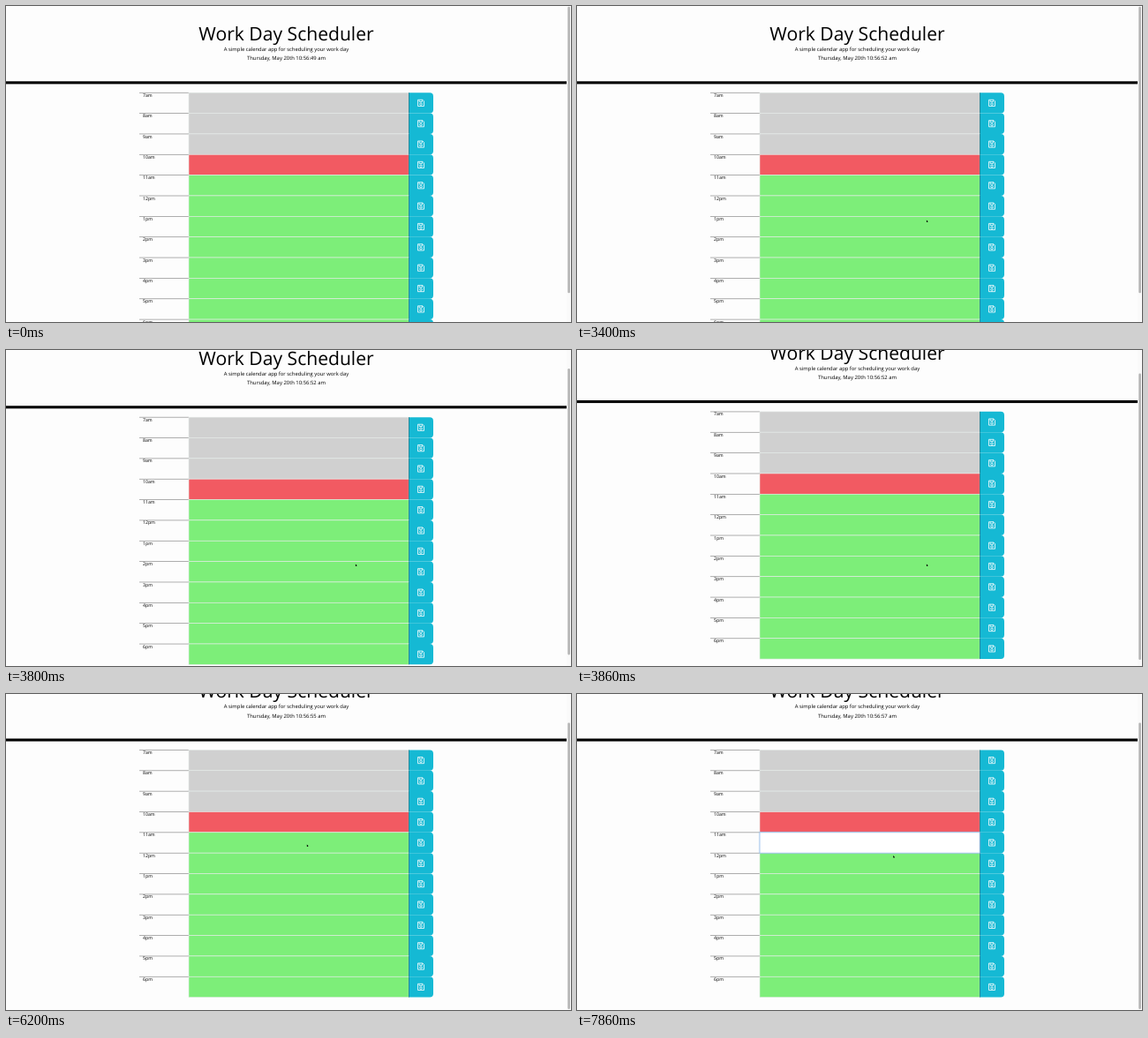
Animation, 640 px wide and 358 px high, one loop 8 s. Source, as an HTML page:

```html
<!DOCTYPE html>
<html lang="en">
<head>
<meta charset="utf-8">
<title>Work Day Scheduler</title>
<style>
html, body { margin: 0; width: 100%; height: 100%; overflow: hidden; background: #fdfdfd; }
svg { display: block; width: 100vw; height: 100vh; font-family: "Open Sans", "Noto Sans", sans-serif; text-rendering: geometricPrecision; }
.mid { text-anchor: middle; }
</style>
</head>
<body>
<svg viewBox="0 0 640 358">
  <defs>
    <g id="disk" fill="none" stroke="#fff" stroke-width=".8">
      <path d="M-3.5 -3.6H2L3.5 -2V3.6H-3.5Z" stroke-linejoin="round"/>
      <path d="M-1.8 -3.4V-1.3H1.4V-3.4"/>
      <rect x="-1.3" y=".3" width="2.6" height="2" rx=".6"/>
    </g>
  </defs>
  <rect width="640" height="358" fill="#fdfdfd"/>
  <g id="page">
    <text class="mid" x="317.5" y="39.3" font-size="21.1">Work Day Scheduler</text>
    <text class="mid" x="317.5" y="51" font-size="5.86">A simple calendar app for scheduling your work day</text>
    <text class="mid" x="317.5" y="61.4" font-size="5.9" id="clock"></text>
    <rect y="85.3" width="635" height="3.1" fill="#000"/>
    <g id="rows"></g>
    <g id="focus">
      <rect id="ring" fill="none" stroke="#80bdff" stroke-width="1.4" stroke-opacity=".35"/>
      <rect id="field" fill="#fff" stroke="#86b2ec" stroke-width=".7"/>
    </g>
  </g>
  <rect x="635" width="5" height="358" fill="#fafafa"/>
  <rect id="thumb" x="636.3" width="2.6" height="324.5" rx="1.3" fill="#b4b4b4"/>
  <path id="cursor" d="M0 0V2.3L1.1 2.7L1.7 1.7Z" fill="#000"/>
</svg>
<script>
const LOOP = 8000, STEP = 1000 / 15;
const TOP = 98.2, PITCH = 23.35, LEFT = 207, SPLIT = 456.2, RIGHT = 484;
const SCROLL_END = 34.8, VIEW = 358;
const GREY = '#d0d0d0', RED = '#f25a62', GREEN = '#7dee79';
const $ = id => document.getElementById(id);

const hourName = h => (h > 12 ? h - 12 : h) + (h < 12 ? 'am' : 'pm');

function rowMarkup(i) {
  const hour = 7 + i, y = TOP + i * PITCH, end = y + PITCH;
  const fill = hour < 10 ? GREY : hour === 10 ? RED : GREEN;
  return `
    <rect x="151" y="${y - .3}" width="${LEFT - 151}" height=".7" fill="#8c8c8c"/>
    <text x="155" y="${y + 4.6}" font-size="5.2">${hourName(hour)}</text>
    <rect x="${LEFT}" y="${y}" width="${SPLIT - LEFT}" height="${PITCH}" fill="${fill}" stroke="#e4ebe8" stroke-width=".6"/>
    <path d="M${SPLIT} ${y}H${RIGHT - 4}q4 0 4 4V${end - 4}q0 4 -4 4H${SPLIT}Z" fill="#15b9d4"/>
    <rect x="${SPLIT - .1}" y="${y}" width=".4" height="${PITCH}" fill="#0a3038"/>
    <use href="#disk" x="470" y="${y + PITCH / 2}"/>`;
}

function placeField(el, grow) {
  const size = {
    x: LEFT - grow, y: TOP + 4 * PITCH - grow,
    width: SPLIT - LEFT + 2 * grow, height: PITCH + 2 * grow
  };
  for (const k in size) el.setAttribute(k, size[k]);
}

const progress = (t, from, to) => Math.min(1, Math.max(0, (t - from) / (to - from)));
const smooth = p => p * p * (3 - 2 * p);

const ENTER = 1599;
const moves = [
  { from: ENTER, to: 2260, x: 401, y: 249 },
  { from: 2533, to: 2733, x: 395.9, y: 242.4 },
  { from: 4867, to: 6200, x: 340.8, y: 170.4 },
  { from: 6200, to: 7000, x: 358, y: 174 },
  { from: 7133, to: 7333, x: 358.2, y: 183 }
];

function mouseAt(t) {
  let x = 549, y = 354;
  for (const m of moves) {
    const p = smooth(progress(t, m.from, m.to));
    x += (m.x - x) * p;
    y += (m.y - y) * p;
  }
  return `${x} ${y}`;
}

$('rows').innerHTML = Array.from({ length: 12 }, (_, i) => rowMarkup(i)).join('');
placeField($('field'), 0);
placeField($('ring'), .8);

function draw(ms) {
  const t = Math.floor((ms + 7) / STEP) * STEP;

  const y = SCROLL_END * smooth(progress(t, 3467, 4000) ** 1.12);
  $('page').setAttribute('transform', `translate(0 ${-y})`);
  $('thumb').setAttribute('y', .8 + y * VIEW / (VIEW + SCROLL_END));

  // the clock runs slightly fast
  const second = 49 + Math.floor((t + 62) * 1.01 / 1000);
  $('clock').textContent = `Thursday, May 20th 10:56:${second} am`;

  $('cursor').setAttribute('transform', `translate(${mouseAt(t)})`);
  $('cursor').style.display = t < ENTER ? 'none' : '';

  $('focus').style.display = t < 6730 ? 'none' : '';
  $('ring').style.opacity = .3 * progress(t, 6730, 6930);
}

const start = performance.now();
function loop() {
  draw((performance.now() - start) % LOOP);
  requestAnimationFrame(loop);
}
loop();
</script>
</body>
</html>
```
